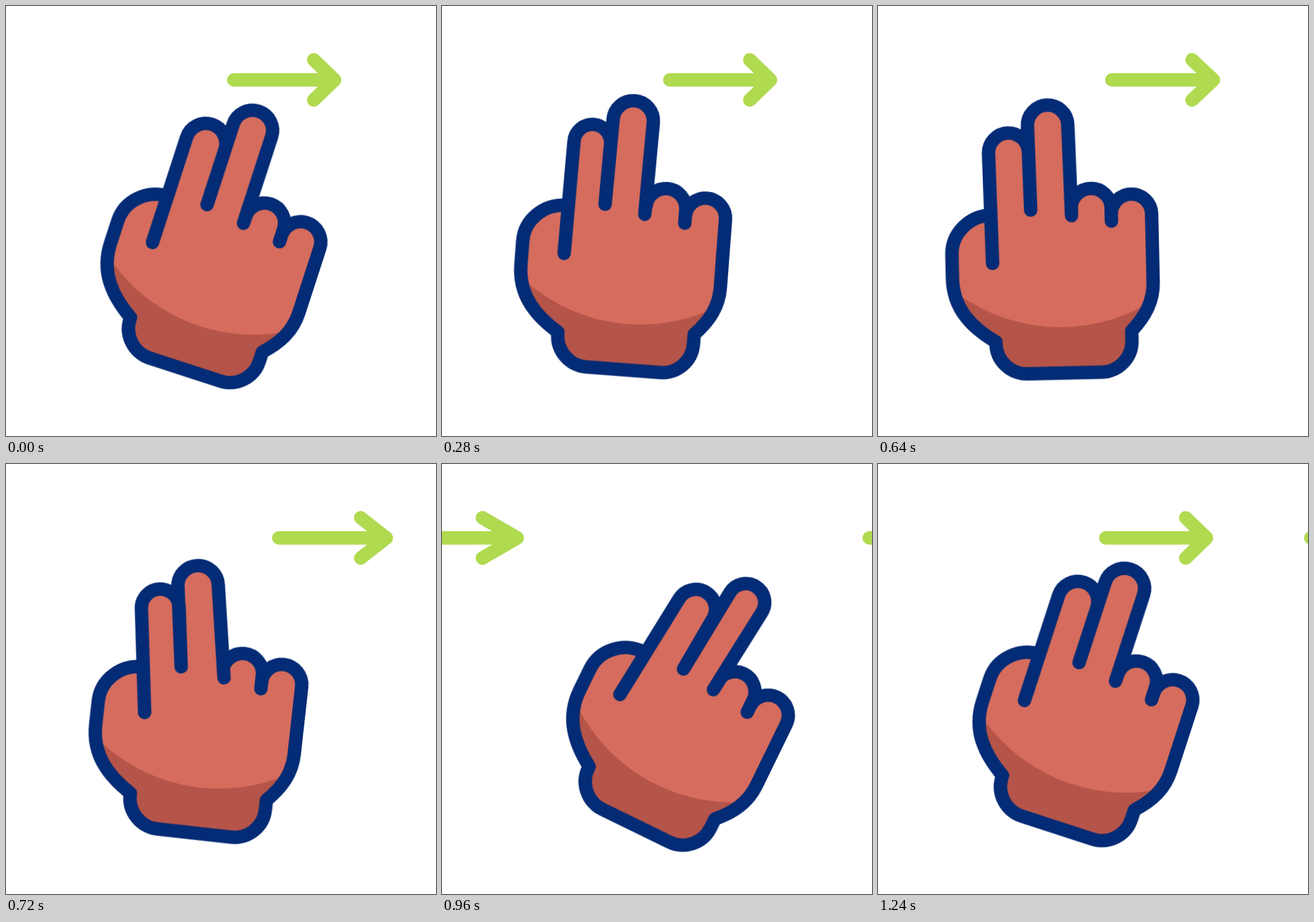
Recreate the animation shown at these times as an HTML page without scripts. Size 640 px wide and 640 px high, loop 1.48 s.

```html
<!DOCTYPE html>
<html lang="en">
<head>
<meta charset="utf-8">
<title>Swipe right</title>
<style>
  html, body { margin: 0; height: 100%; overflow: hidden; background: #fff; }
  svg { display: block; width: 100vw; height: 100vh; }

  .outline { stroke: #042b75; stroke-width: 20; stroke-linecap: round; stroke-linejoin: round; }
  .skin { fill: #d56c5d; }
  .shade { fill: #b55448; }
  .arrow { fill: none; stroke: #b0da50; stroke-width: 20; stroke-linecap: round; stroke-linejoin: round; }

  .hand, .fingers, .arrow { animation: 1480ms linear infinite; }
  .hand { animation-name: swing; }
  .fingers { animation-name: bend; }
  .leaving { animation-name: leave; }
  .entering { animation-name: enter; }

  @keyframes swing {
    0%, 83.784%, 100% { transform: translate(285px, 513px) rotate(18deg); }
    2.703% { transform: translate(285px, 513px) rotate(18deg); animation-timing-function: cubic-bezier(.4, 0, .7, .62); }
    18.919% { transform: translate(281px, 509.6px) rotate(4.4deg); animation-timing-function: cubic-bezier(.28, .6, .6, 1); }
    32.432% { transform: translate(285px, 513px) rotate(-2.2deg); }
    40.541% { transform: translate(285px, 513px) rotate(-2.2deg); animation-timing-function: cubic-bezier(.45, 0, .72, .5); }
    48.649% { transform: translate(292.5px, 518px) rotate(6.2deg); animation-timing-function: cubic-bezier(.3, .37, .65, 1); }
    62.162% { transform: translate(312px, 513px) rotate(26.4deg); animation-timing-function: cubic-bezier(.333, 0, .667, 1); }
  }

  /* The two long fingers trail behind the hand as it swings. */
  @keyframes bend {
    0%, 32.432%, 83.784%, 100% { d: path("M-113.5-132.4L-113.5-297A9 9 0 0 1-53.6-297L-53.6-211L-53.6-337A9 9 0 0 1 6.5-337L6.5-201.5"); }
    2.703% {
      d: path("M-113.5-132.4L-113.5-297A9 9 0 0 1-53.6-297L-53.6-211L-53.6-337A9 9 0 0 1 6.5-337L6.5-201.5");
      animation-timing-function: cubic-bezier(.4, 0, .7, .62);
    }
    18.919% {
      d: path("M-109.6-133.6L-107.5-301A9 9 0 0 1-53-301L-54.4-211L-52-338A9 9 0 0 1 8-338L5.6-200.6");
      animation-timing-function: cubic-bezier(.28, .6, .6, 1);
    }
    40.541% {
      d: path("M-113.5-132.4L-113.5-297A9 9 0 0 1-53.6-297L-53.6-211L-53.6-337A9 9 0 0 1 6.5-337L6.5-201.5");
      animation-timing-function: cubic-bezier(.45, 0, .72, .5);
    }
    48.649% {
      d: path("M-102-137.8L-124-291A9 9 0 0 1-68.5-299L-55.6-211.2L-73.7-329.5A9 9 0 0 1-14.3-338.5L9.7-202");
      animation-timing-function: cubic-bezier(.3, .37, .65, 1);
    }
    62.162% {
      d: path("M-116-132.6L-98.5-299.5A9 9 0 0 1-40.5-293.5L-47.2-208L-34.5-341A9 9 0 0 1 21-335L6-200");
      animation-timing-function: cubic-bezier(.333, 0, .667, 1);
    }
  }

  @keyframes leave {
    0% { d: path("M339 110H489M458 80L489 110L458 140"); }
    40.541% {
      d: path("M339 110H489M458 80L489 110L458 140");
      animation-timing-function: cubic-bezier(.333, 0, .667, 1);
    }
    67.568%, 100% { d: path("M644 110H841M777 80L841 110L777 140"); }
  }

  @keyframes enter {
    0% { d: path("M-330 110H-110M-172 80L-110 110L-172 140"); }
    54.054% {
      d: path("M-330 110H-110M-172 80L-110 110L-172 140");
      animation-timing-function: cubic-bezier(.33, 0, .7, .66);
    }
    64.865% { d: path("M-85 110H110.5M58.5 80L110.5 110L58.5 140"); }
    72.973% {
      d: path("M119.5 110H293M251.5 80L293 110L251.5 140");
      animation-timing-function: cubic-bezier(.5, .63, .8, 1);
    }
    83.784%, 100% { d: path("M339 110H489M458 80L489 110L458 140"); }
  }
</style>
</head>
<body>
<svg viewBox="0 0 640 640">
  <defs>
    <path id="palm" d="M-112-205A60.5 58 0 0 0-172.5-147V-112C-172.5-66-145-38-110-16V-13.5a46 46 0 0 0 46 46H46.5a46 46 0 0 0 46-46V-28C114-50 126-72 126-100V-201.5a30 30 0 0 0-60 0V-191.7V-211.5a29.75 29.75 0 0 0-59.5 0"/>
    <clipPath id="palm-area"><use href="#palm"/></clipPath>
  </defs>

  <path class="arrow leaving" d="M339 110H489M458 80L489 110L458 140"/>
  <path class="arrow entering" d="M-330 110H-110M-172 80L-110 110L-172 140"/>

  <g class="hand">
    <use href="#palm" class="skin"/>
    <path class="shade" clip-path="url(#palm-area)" d="M-180-101A260 260 0 0 0 122-70.5L140 50H-180Z"/>
    <use href="#palm" class="outline" fill="none"/>
    <path class="skin outline fingers" d="M-113.5-132.4L-113.5-297A9 9 0 0 1-53.6-297L-53.6-211L-53.6-337A9 9 0 0 1 6.5-337L6.5-201.5"/>
  </g>
</svg>
</body>
</html>
```
